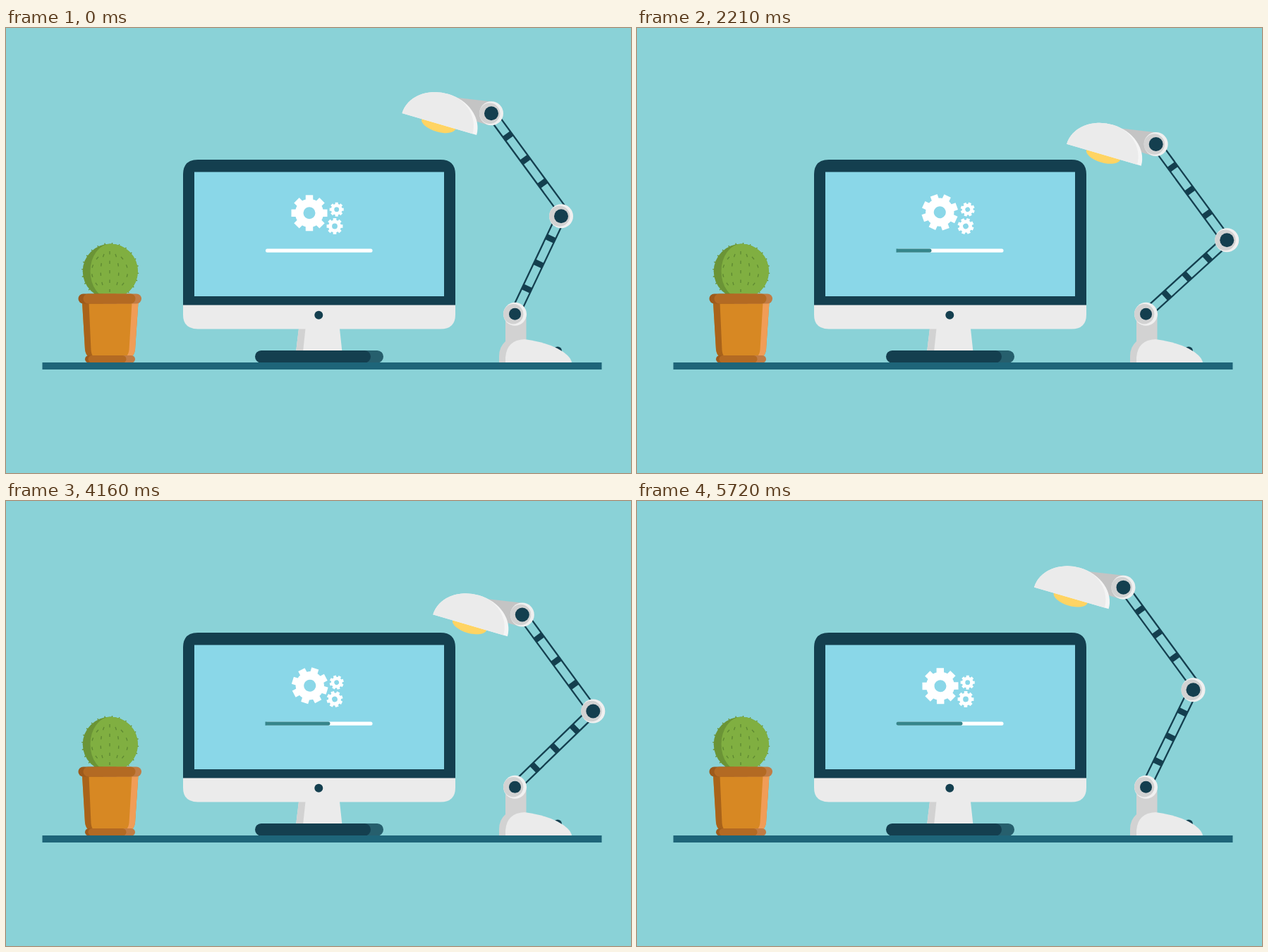
Write an HTML page that moves like this. It is 886 px wide and 632 px high and loops after 5.85 s.

```html
<!DOCTYPE html>
<html lang="en">
<head>
<meta charset="utf-8">
<title>Desk with loading screen</title>
<style>
  html, body { margin: 0; width: 100%; height: 100%; overflow: hidden; background: #8ad2d7; }
  svg { display: block; width: 100vw; height: 100vh; }
</style>
</head>
<body>
<svg viewBox="0 0 886 632" xmlns="http://www.w3.org/2000/svg">
  <rect width="886" height="632" fill="#8ad2d7"/>

  <!-- cactus -->
  <g id="spikes" stroke="#6b9436" stroke-width="1.4"></g>
  <circle cx="147.7" cy="345.5" r="39" fill="#6b9436"/>
  <path d="M148 306.5A39 39 0 0 1 148 384.5A28.5 39 0 0 1 148 306.5" fill="#80af41"/>
  <g id="needles" fill="none" stroke="#5f8a33" stroke-width="1.4" stroke-dasharray="4.5 9"></g>

  <!-- pot -->
  <path d="M108 390H187.5L183 457Q182 464 178 467H117Q113 464 112 457Z" fill="#d78823"/>
  <path d="M108 390H117.500L120.500 457Q121 464 124 467H117Q113 464 112 457Z" fill="#a9631a"/>
  <path d="M178.500 390H187.500L183 457Q182 464 178 467H170Q174 463 174.500 457Z" fill="#f09d57"/>
  <rect x="102.500" y="377.500" width="60" height="14" rx="7" fill="#9d5a1c"/>
  <rect x="132" y="377.500" width="60" height="14" rx="7" fill="#c17c44"/>
  <rect x="109.500" y="377.500" width="74" height="14" rx="7" fill="#b36a23"/>
  <rect x="112" y="465" width="50" height="10.500" rx="5.200" fill="#9d5a1c"/>
  <rect x="132" y="465" width="51" height="10.500" rx="5.200" fill="#c17c44"/>
  <rect x="116.500" y="465" width="54" height="10.500" rx="5.200" fill="#b36a23"/>

  <!-- monitor -->
  <path d="M415 427H473L476.500 460H411Z" fill="#ebebeb"/>
  <path d="M415 427H424.500L421 460H411Z" fill="#d2d2d2"/>
  <rect x="400" y="458" width="135" height="17.500" rx="8.700" fill="#265f6d"/>
  <rect x="353" y="458" width="164" height="17.500" rx="8.700" fill="#143f4f"/>
  <path d="M251 394V208Q251 187 272 187H616Q637 187 637 208V394Z" fill="#143f4f"/>
  <path d="M251 393.500H637V407Q637 427.500 616 427.500H272Q251 427.500 251 407Z" fill="#ebebeb"/>
  <circle cx="443.300" cy="407.800" r="6" fill="#143f4f"/>
  <rect x="267" y="204.500" width="354" height="176.500" fill="#8ad7e8"/>
  <g id="gears" fill="#fff"></g>
  <rect x="368" y="313.500" width="151.500" height="5.200" rx="2.500" fill="#fff"/>
  <path id="bar" fill="#35858b"/>

  <!-- lamp foot -->
  <circle cx="782" cy="458.500" r="6" fill="#143f4f"/>
  <path d="M708 406H737.500V475H699V466Q699 453 708 445Z" fill="#d2d2d2"/>
  <path d="M708 475V468Q710 443 735 442Q778 448 796 465Q801 470 802 475Z" fill="#ebebeb"/>
  <rect x="51.500" y="475" width="793" height="10" fill="#1e6579"/>

  <!-- lamp arm -->
  <g id="lower"></g>
  <g id="base"></g>
  <g id="top">
    <g id="upper"></g>
    <path d="M640 99L688 104.500L684 138L655 129Z" fill="#c4c4c4"/>
    <g transform="translate(614.300 136.500) rotate(16.300)">
      <ellipse cx="-1" rx="25" ry="11.300" fill="#ffd463"/>
      <path d="M-55 0A55 44.600 0 0 1 55 0Z" fill="#f5f5f5"/>
      <path d="M-55 0A55 44.600 0 0 1 0 -44.600A49 44.600 0 0 1 49 0Z" fill="#ebebeb"/>
    </g>
    <g id="wrist"></g>
  </g>
  <g id="elbow"></g>
</svg>
<script>
const LOOP = 5850, STEP = 130;
const DARK = '#143f4f';
const $ = id => document.getElementById(id);
const clamp = x => Math.max(0, Math.min(1, x));
// Cubic ease with a chosen starting speed and a soft stop.
const ease = (x, v = 0) => {
  x = clamp(x);
  return x * x * (3 - 2 * x) + v * x * (1 - x) * (1 - x);
};
const span = (t, from, to, v) => ease((t - from) / (to - from), v);

// Two rails with three blocks, pointing along +x.
function arm(length, blocks) {
  const rails = [-6.6, 6.6].map(y => `<path d="M0 ${y}H${length}"/>`).join('');
  const bars = blocks.map(x => `<rect x="${x - 4.2}" y="-6.8" width="8.4" height="13.6"/>`).join('');
  return `<g stroke="${DARK}" stroke-width="2.3">${rails}</g><g fill="${DARK}">${bars}</g>`;
}

function joint(x, y, r, hub) {
  return `<circle cx="${x}" cy="${y}" r="${r}" fill="#f0f0f0"/>
    <circle cx="${x - 2.3}" cy="${y}" r="${r - 2.3}" fill="#d2d2d2"/>
    <circle cx="${x}" cy="${y}" r="${hub}" fill="${DARK}"/>`;
}

function gear(id, x, y, r, hole) {
  const w = r * 0.41;
  let teeth = '';
  for (let a = 0; a < 180; a += 45)
    teeth += `<rect x="${-w / 2}" y="${-r}" width="${w}" height="${2 * r}" transform="rotate(${a})"/>`;
  return `<g id="${id}"><g transform="translate(${x} ${y})">${teeth}
    <circle r="${r * 0.79}"/><circle r="${hole}" fill="#8ad7e8"/></g></g>`;
}

function cactus() {
  let edge = '', lines = '';
  for (let a = 0; a < 360; a += 15)
    edge += `<path d="M37 0H40.6" transform="translate(147.7 345.5) rotate(${a + 4})"/>`;
  for (let k = -2; k <= 2; k++) {
    const x = 147 + k * 8, y = 317 + Math.abs(k) * 4, bend = 147 + k * 17.5;
    lines += `<path d="M${x} ${y}Q${bend} 346 ${x} ${692 - y}"/>`;
  }
  $('spikes').innerHTML = edge;
  $('needles').innerHTML = lines;
}

cactus();
$('gears').innerHTML = gear('big', 430, 262.8, 25.5, 8.5) +
  gear('small', 468.7, 257.7, 10, 3.4) + gear('mid', 466, 281.5, 11.4, 3.9);
$('lower').innerHTML = arm(152, [40, 79, 118.5]);
$('upper').innerHTML = arm(167, [40, 81.5, 123]);
$('upper').setAttribute('transform', 'translate(688 121.3) rotate(53.8)');
$('base').innerHTML = joint(721.5, 406.3, 16.5, 8.5);
$('wrist').innerHTML = joint(688, 121.3, 17, 10);
$('elbow').innerHTML = joint(0, 0, 17, 10);

const turn = (id, a, x, y) => $(id).setAttribute('transform', `rotate(${a} ${x} ${y})`);

function drop(t) {
  return span(t, 0, 950, 0.63) - span(t, 1950, 3250)
    + span(t, 3250, 4550, 0.63) - span(t, 4550, 5850);
}

function drawLamp(p) {
  const x = 787 + 55 * p, y = 267.2 + 38 * p;
  const a = Math.atan2(y - 406.3, x - 721.3) * 180 / Math.PI;
  $('lower').setAttribute('transform', `translate(721.3 406.3) rotate(${a})`);
  $('elbow').setAttribute('transform', `translate(${x} ${y})`);
  $('top').setAttribute('transform', `translate(${53.2 * p} ${48.8 * p})`);
}

function drawBar(t) {
  const end = 367.5 + 21.5 * span(t, 0, 780) + 57 * span(t, 1560, 2860) + 15.5 * span(t, 2970, 4510);
  const r = Math.min(2.6, end - 367.5), x = end - r;
  const left = t < 4290 ? 'H367.5V313.5Z' : 'H370.2A2.6 2.6 0 0 1 370.2 313.500Z';
  $('bar').setAttribute('d', r > 0 ? `M${x} 313.5A${r} 2.6 0 0 1 ${x} 318.7${left}` : '');
}

function draw(t) {
  const spin = 360 * ease(t / LOOP);
  turn('big', spin, 430, 262);
  turn('small', -spin, 468.7, 257.7);
  turn('mid', -spin, 466, 281.5);
  drawBar(t);
  drawLamp(drop(t));
}

function tick() {
  const t = (performance.now() + 1) % LOOP;
  draw(Math.floor(t / STEP) * STEP);
  requestAnimationFrame(tick);
}
draw(0);
requestAnimationFrame(tick);
</script>
</body>
</html>
```
